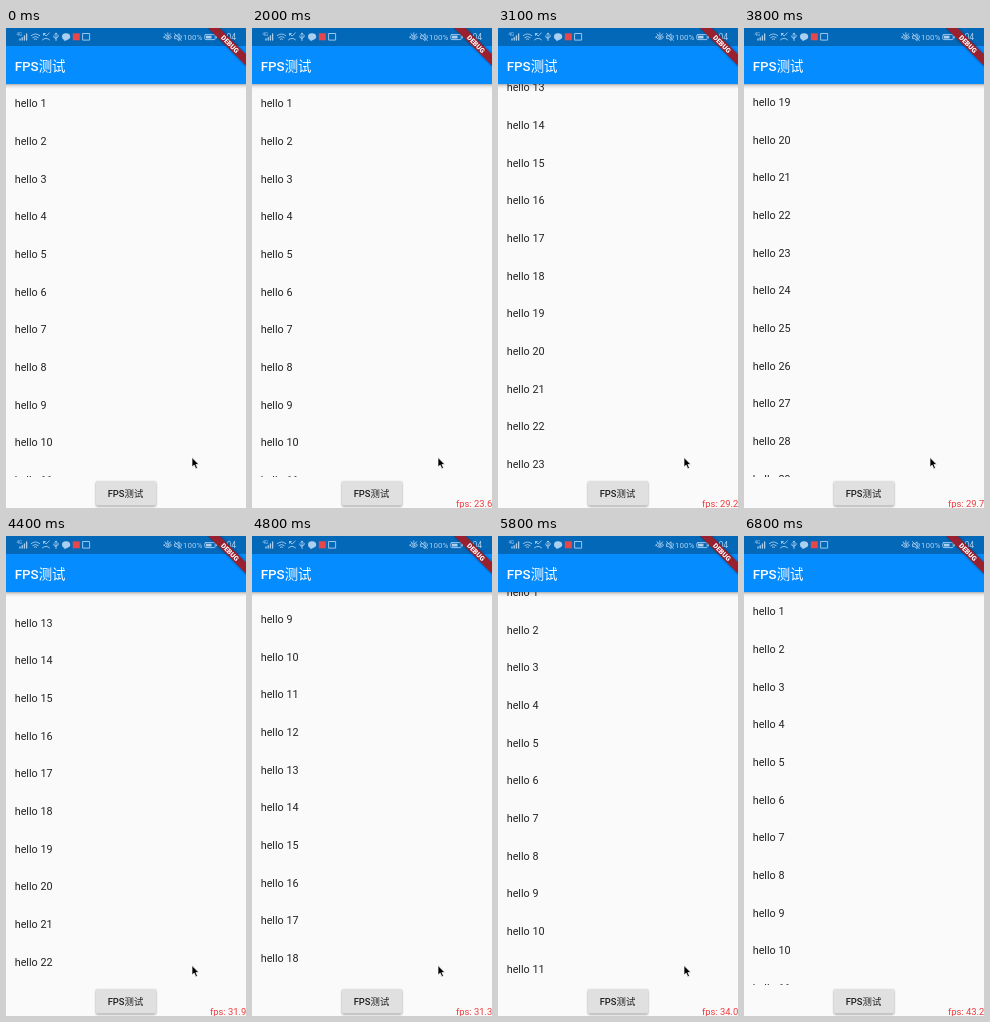
Animation, 240 px wide and 480 px high, one loop 6.9 s. Source, as an HTML page:

```html
<!DOCTYPE html>
<html lang="zh">
<head>
<meta charset="utf-8">
<title>FPS测试</title>
<style>
html, body { margin: 0; width: 100%; height: 100%; overflow: hidden; background: #fafafa; }
svg { display: block; width: 100vw; height: 100vh; }
text { font-family: Roboto, "Noto Sans CJK SC", "Noto Sans CJK", sans-serif; white-space: pre; }
.medium { font-weight: 500; }
.icons { fill: none; stroke: #a9d0f1; stroke-width: .9; stroke-linecap: round; stroke-linejoin: round; }
.icons .solid { fill: #a9d0f1; stroke: none; }
</style>
</head>
<body>
<svg viewBox="0 0 240 480" xmlns="http://www.w3.org/2000/svg">
  <defs>
    <clipPath id="view"><rect y="56" width="240" height="393"/></clipPath>
    <linearGradient id="shade" x2="0" y2="1">
      <stop stop-color="#000" stop-opacity=".3"/>
      <stop offset=".4" stop-color="#000" stop-opacity=".1"/>
      <stop offset="1" stop-color="#000" stop-opacity="0"/>
    </linearGradient>
    <filter id="soft" x="-20%" y="-40%" width="140%" height="190%"><feGaussianBlur stdDeviation="1.2"/></filter>
  </defs>
  <rect width="240" height="480" fill="#fafafa"/>

  <g clip-path="url(#view)">
    <g id="list" font-size="10.8" fill="#222"></g>
  </g>

  <rect y="56" width="240" height="5" fill="url(#shade)"/>
  <rect width="240" height="56" fill="#058cff"/>
  <rect width="240" height="18" fill="#0468b9"/>
  <text class="medium" x="8.7" y="43" font-size="13.4" fill="#fff">FPS测试</text>

  <g class="icons">
    <text class="solid" x="10.5" y="8.3" font-size="4.5">4G</text>
    <path d="M14 12v-1M16.2 12V9.7M18.4 12V8M20.6 12V6" stroke-width="1.3"/>
    <path d="M25.3 7.6q4.2-3.4 8.4 0M26.8 9.5q2.7-2.2 5.4 0M28.3 11.2q1.2-.9 2.4 0"/>
    <path d="M36.5 11.8q3.6-3 7 0M37.5 5.5l2.6 2.5 3.2-3M37.5 7.3V5.5h1.8"/>
    <path d="M50 12.5V5.2M48.9 6.3L50 5l1.1 1.3M47.9 7.8v1.5l2.1 1.3M52.1 7.3v1.6L50 10"/>
    <path class="solid" d="M56 8.7a4.1 3.4 0 1 1 5 3.2l-2.6 1.3v-1.2a4 3.4 0 0 1-2.4-3.3z"/>
    <rect x="66.8" y="5.3" width="7" height="7" fill="#e5474b" stroke="none"/>
    <rect x="77" y="5.5" width="6.6" height="6.6"/>
    <path d="M158 9.2q3.8-4.6 7.6 0q-3.8 4.4-7.6 0zM159 5.8l.8 1M161.8 4.8v1.1M164.6 5.8l-.8 1"/>
    <circle cx="161.8" cy="9.2" r="1.1"/>
    <path d="M169 7.8h1.6l2.5-2v6.8l-2.5-2H169zM168.5 5.5l6.8 7M175 7.5q1 1.5 0 3"/>
    <text class="solid" x="177" y="12.1" font-size="8">100%</text>
    <rect x="198.8" y="6.6" width="10.4" height="5" rx="1"/>
    <path class="solid" d="M200 7.8h5.5v2.6H200zM209.8 8h1.2v2.2h-1.2z"/>
    <text class="solid" x="213.5" y="12.2" font-size="8.6">3:04</text>
  </g>

  <g transform="translate(240 0) rotate(45)">
    <rect x="-27" y="18.7" width="54" height="8" fill="#000" opacity=".45" filter="url(#soft)"/>
    <rect x="-27" y="18.7" width="54" height="8" fill="#98202f"/>
    <text y="25.1" text-anchor="middle" font-size="6.8" font-weight="900" fill="#fff">DEBUG</text>
  </g>

  <rect x="90" y="454" width="60" height="24.5" rx="1.4" fill="#000" opacity=".4" filter="url(#soft)"/>
  <rect x="90" y="453" width="60" height="24.5" rx="1.4" fill="#e0e0e0"/>
  <text class="medium" x="119.5" y="469.2" text-anchor="middle" font-size="9.4" fill="#1c1c1c">FPS测试</text>

  <text id="fps" x="204" y="479" font-size="9.4" fill="#f0383a"></text>
  <path id="cursor" d="M186 429.5v9.6l2.2-2 1.6 3.6 1.7-.8-1.6-3.4h3z" fill="#000" stroke="#fff" stroke-width=".7"/>
</svg>
<script>
const LOOP = 6900, STEP = 100, ROWS = 34, PITCH = 37.67;
const $ = id => document.getElementById(id);
const list = $('list'), fps = $('fps'), cursor = $('cursor');

for (let i = 0; i < ROWS; i++) {
  const row = document.createElementNS('http://www.w3.org/2000/svg', 'text');
  row.setAttribute('x', 8.7);
  row.setAttribute('y', 79.3 + i * PITCH);
  row.textContent = 'hello ' + (i + 1);
  list.append(row);
}

// Each fling: start, end, distance
const flings = [
  [2000, 3100, 468], [3100, 3800, 211.5],
  [4000, 5240, -441.3], [5300, 6000, -238.2]
];
const rates = [
  [900, 18.4], [1000, 18.4], [1700, 23.6], [2000, 23.6], [3100, 29.2],
  [3800, 29.7], [4400, 31.9], [5300, 30.5], [6000, 35.4], [6800, 43.2]
];
const clamp = p => Math.min(1, Math.max(0, p));
const easeOut = p => 1 - (1 - p) ** 2;

const scrollAt = t => flings.reduce(
  (y, [a, b, d]) => y + d * easeOut(clamp((t - a) / (b - a))), 0);

function rateAt(t) {
  let value = rates[0][1];
  for (let i = 1; i < rates.length; i++) {
    const [a, from] = rates[i - 1], [b, to] = rates[i];
    value += (to - from) * clamp((t - a) / (b - a));
  }
  return value;
}

function draw(time) {
  const t = Math.floor(time % LOOP / STEP) * STEP;
  list.setAttribute('transform', `translate(0 ${-scrollAt(t).toFixed(2)})`);
  fps.textContent = t < 900 ? '' : 'fps: ' + rateAt(t).toFixed(1);
  cursor.setAttribute('visibility', t < 6000 ? 'visible' : 'hidden');
}

const start = performance.now();
function tick() {
  draw(performance.now() - start);
  requestAnimationFrame(tick);
}
tick();
</script>
</body>
</html>
```
